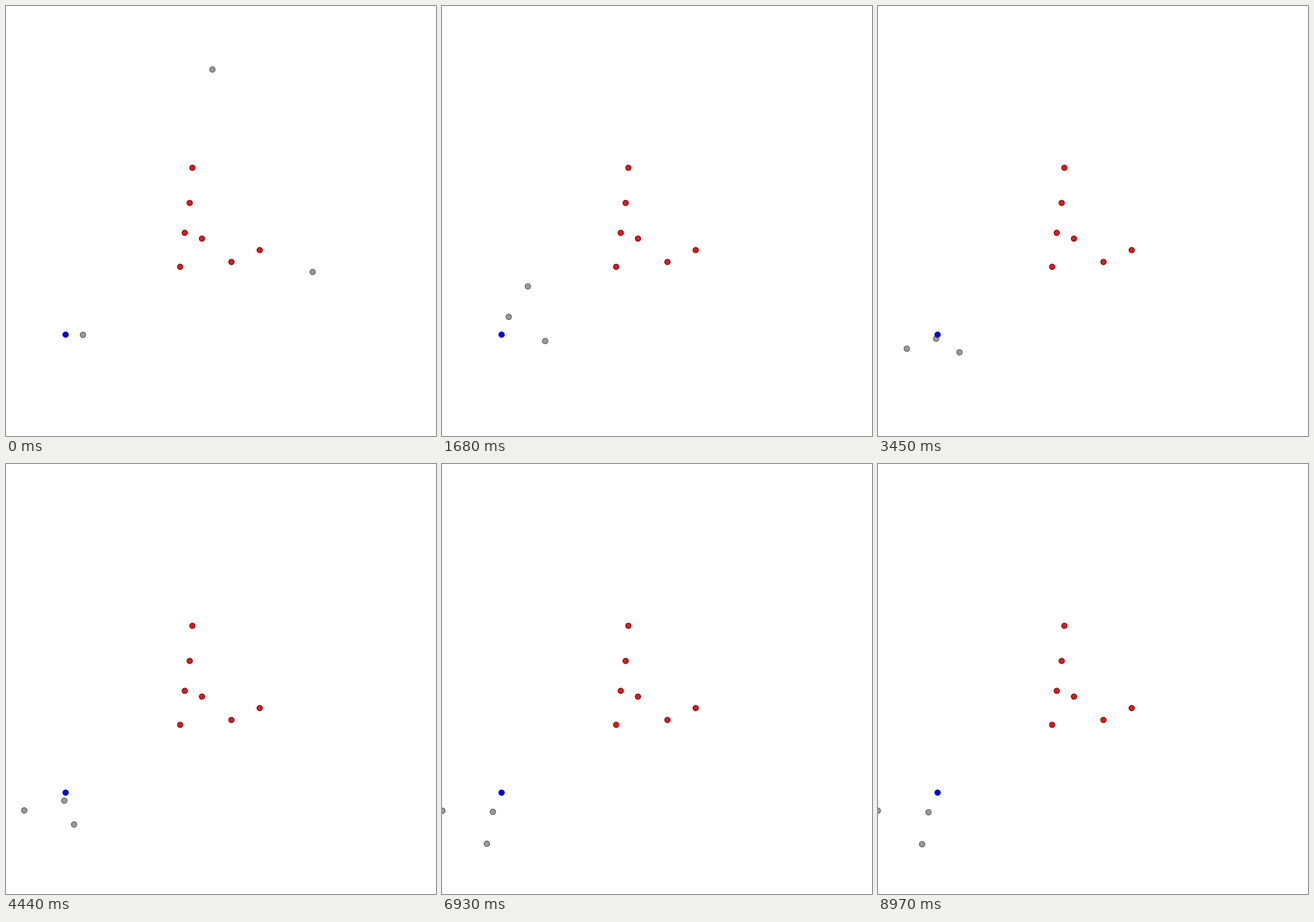
These frames come from a looping animation (700x700 px, 9 s). A matplotlib script:

```python
import numpy as np
import matplotlib.pyplot as plt
from matplotlib.animation import FuncAnimation
from matplotlib.patches import Circle

SIZE, DPI = 700, 100
FRAMES, STEP = 300, 30
ARRIVE, DETOUR, DRIFT = 2490, 2150, 2900

GOAL = (97, 535)
OBSTACLES = [(303.4, 263.4), (299, 320.6), (291, 369.3), (319, 378.7),
             (413, 397.4), (367, 416.7), (283.5, 424.6)]


class Agent:
    """Runs to the first point of its drift curve, then eases along the curve."""

    def __init__(self, start, curve, arrive=ARRIVE, detour=(0, 0)):
        self.start = np.array(start)
        self.curve = np.array(curve)
        self.arrive = arrive
        self.detour = np.array(detour)

    def drift(self, t):
        f = np.tanh((max(t - ARRIVE, 0) / DRIFT) ** 2)
        return np.array([(1 - f) ** 2, 2 * f * (1 - f), f * f]) @ self.curve

    def at(self, t):
        run = np.sin(np.pi / 2 * min(t / self.arrive, 1) ** 1.3)
        swing = np.sin(np.pi * min(t / DETOUR, 1)) ** 2
        return self.start * (1 - run) + self.drift(t) * run + self.detour * swing


AGENTS = [
    Agent((336, 103.4), [(93.3, 540), (100.8, 546.5), (82.2, 567)]),
    Agent((499.2, 433), [(140.2, 554.8), (105.2, 596.7), (71.8, 619)], arrive=2100),
    Agent((125.3, 535.4), [(53, 554.8), (24.8, 570), (-0.3, 564.3)],
          detour=(104, -112)),
]

fig = plt.figure(figsize=(SIZE / DPI, SIZE / DPI), dpi=DPI, facecolor="white")
ax = fig.add_axes([0, 0, 1, 1])
ax.set_xlim(0, SIZE)
ax.set_ylim(SIZE, 0)
ax.axis("off")


def dot(pos, fill, edge, z):
    return ax.add_patch(Circle(pos, 4.5, facecolor=fill, edgecolor=edge,
                               linewidth=72 / DPI, zorder=z))


for pos in OBSTACLES:
    dot(pos, "#e6141a", "#5a1010", 1)
dot(GOAL, "#0000ff", "#000090", 3)
dots = [dot(agent.start, "#999999", "#505050", 2) for agent in AGENTS]


def update(frame):
    for mark, agent in zip(dots, AGENTS):
        mark.center = agent.at(frame * STEP)
    return dots


anim = FuncAnimation(fig, update, frames=FRAMES, interval=STEP,
                     repeat=True, repeat_delay=0, blit=False)
plt.show()
```
